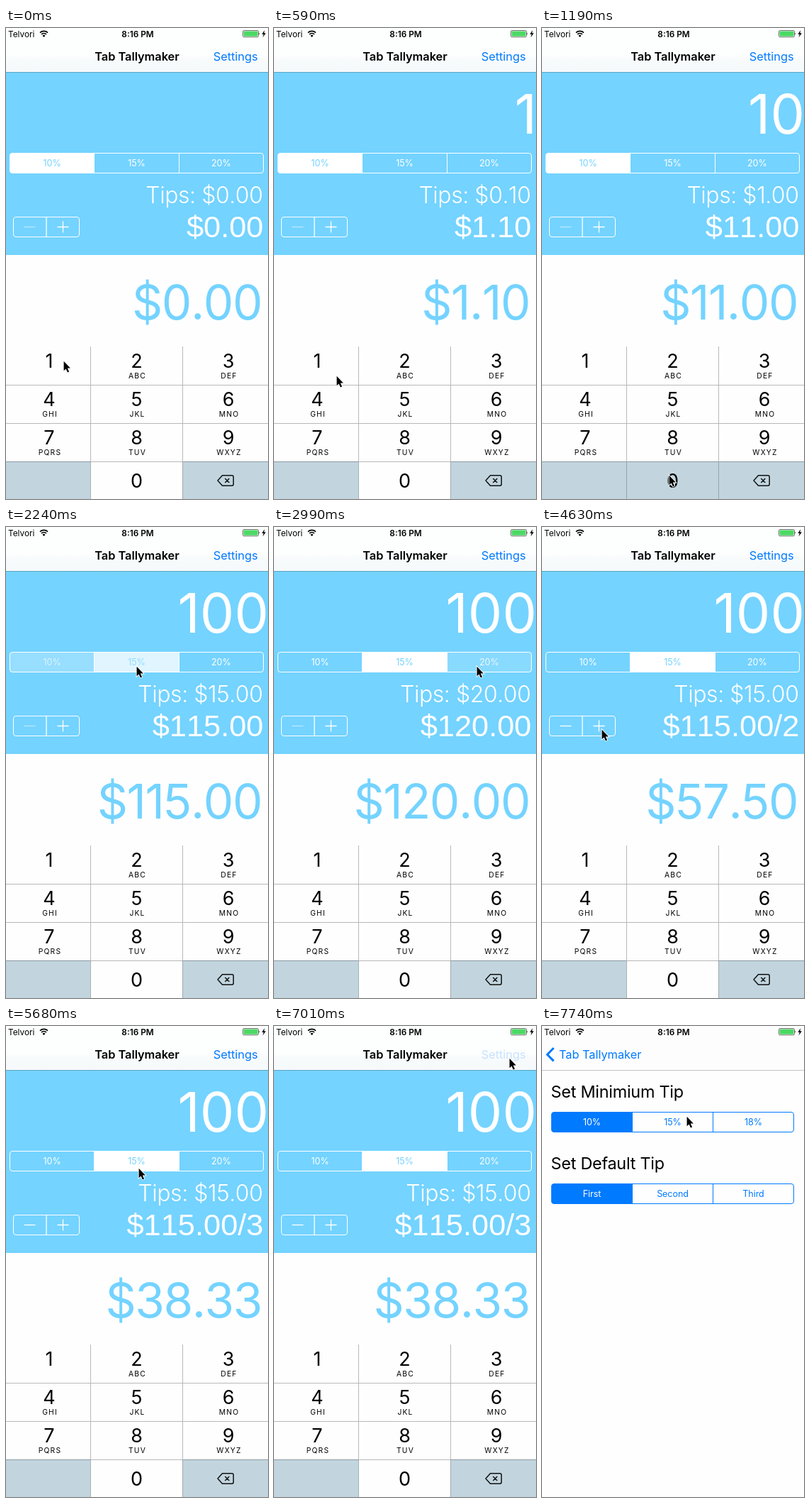
Write an HTML page that moves like this. It is 370 px wide and 664 px high and loops after 8000 ms.

```html
<!DOCTYPE html>
<html lang="en">
<head>
<meta charset="utf-8">
<title>Tip splitter</title>
<style>
  html, body { margin: 0; width: 100%; height: 100%; overflow: hidden; background: #fefefe; }
  svg { display: block; width: 100%; height: 100%; font-family: Inter, "Open Sans", sans-serif; }
  .mid { text-anchor: middle; }
  .end { text-anchor: end; }
  .label { font-size: 12.6px; letter-spacing: -.1px; }
  .nav { font-size: 16.4px; letter-spacing: -.05px; fill: #007aff; }
  .title { font-weight: 600; fill: #000; }
  .heading { font-size: 23.4px; letter-spacing: -.25px; }
  .digit { font-size: 27px; }
  .letters { font-size: 10.3px; letter-spacing: 1.2px; }
  .line { fill: none; stroke: #fff; }
  .figures { text-anchor: end; fill: #fff; font-kerning: none; }
  #total { font-family: "Liberation Sans", Arial, sans-serif; }
</style>
</head>
<body>
<svg viewBox="0 0 370 664">
  <defs>
    <linearGradient id="barTint" x2="0" y2="1">
      <stop offset=".6" stop-color="#fdfefe"/>
      <stop offset=".72" stop-color="#f8fbfc"/>
      <stop offset="1" stop-color="#f6f9fb"/>
    </linearGradient>
  </defs>

  <g id="main">
    <rect width="370" height="664" fill="#fefefe"/>
    <rect y="62" width="370" height="258" fill="#74d3ff"/>
    <g class="figures">
      <text id="amount" x="371" y="148.5" font-size="77"/>
      <text id="tips" x="362.5" y="247" font-size="32" font-weight="350" letter-spacing="-.45"/>
      <text id="total" x="363.5" y="295" font-size="43.4"/>
      <text id="share" x="361" y="411" font-size="67.5" letter-spacing="-1.5" fill="#74d3ff"/>
    </g>
    <g id="rates"></g>
    <rect id="plusPress" x="57" y="267" width="46" height="27" fill="#fff" opacity="0"/>
    <rect class="line" x="10.5" y="266.5" width="93" height="28" rx="3.5"/>
    <path class="line" d="M57 266.5v28M72.5 280.5h16M80.5 272.5v16" stroke-width="1.3"/>
    <path id="minus" class="line" d="M25.5 280.5h16" stroke-width="1.3"/>
    <g id="keypad"></g>
  </g>

  <g id="settings">
    <rect width="370" height="664" fill="#fefefe"/>
    <text class="heading" x="12.5" y="101">Set Minimium Tip</text>
    <text class="heading" x="12.5" y="202">Set Default Tip</text>
    <g id="choices"></g>
  </g>

  <rect width="370" height="62" fill="#fdfdfe"/>
  <rect id="tint" width="370" height="62" fill="url(#barTint)"/>
  <path d="M0 62.5h370" stroke="#000" opacity=".22"/>
  <text id="title" class="nav title mid" x="185" y="46">Tab Tallymaker</text>
  <text id="settingsLink" class="nav end" x="355.5" y="46">Settings</text>
  <g id="back">
    <path d="M16.5 31l-9 9.2 9 9.2" fill="none" stroke="#007aff" stroke-width="3"/>
    <text id="backLabel" class="nav" x="24" y="46">Tab Tallymaker</text>
  </g>

  <g id="status">
    <text x="3" y="12.5" font-size="11.8">Telvori</text>
    <path d="M48 6.6a8 8 0 0 1 11 0M50 8.9a5.2 5.2 0 0 1 7 0" fill="none" stroke="#000" stroke-width="1.7"/>
    <path d="M53.5 13l-2-2.3a3 3 0 0 1 4 0z"/>
    <text class="mid" x="186" y="12.5" font-size="11.8" font-weight="600">8:16 PM</text>
    <rect x="334.5" y="3.5" width="22" height="9.3" rx="1.6" fill="none" stroke="#555" stroke-width=".8"/>
    <rect x="335.5" y="4.5" width="20" height="7.3" rx=".8" fill="#4cd964"/>
    <path d="M357.3 6.3q1.6 1.7 0 3.4z"/>
    <path d="M365.3 3l-4 5.7h2.5l-1.3 4.6 4.4-6h-2.6z"/>
  </g>

  <path id="cursor" d="M.6 .8v13.4l3-2.8 2.3 5 2.2-1-2.3-4.9h4.1z" stroke="#fff" stroke-width="1.8" paint-order="stroke"/>
</svg>

<script>
const $ = id => document.getElementById(id);

function add(parent, tag, attrs, text = '') {
  const node = document.createElementNS('http://www.w3.org/2000/svg', tag);
  for (const name in attrs) node.setAttribute(name, attrs[name]);
  node.textContent = text;
  return parent.appendChild(node);
}

// Segmented control; returns its cells so they can be faded.
function segments(parent, x, y, width, labels, color) {
  const cell = width / labels.length;
  const cells = labels.map((label, i) => ({
    fill: add(parent, 'rect', { x: x + cell * i, y, width: cell, height: 28, rx: i ? 0 : 3, fill: color, opacity: 0 }),
    text: add(parent, 'text', { class: 'label mid', x: x + cell * (i + .5), y: y + 18.5, fill: color }, label)
  }));
  add(parent, 'rect', { x, y, width, height: 28, rx: 3.5, fill: 'none', stroke: color });
  for (let i = 1; i < labels.length; i++) {
    add(parent, 'path', { d: `M${Math.floor(x + cell * i) + .5} ${y}v28`, stroke: color });
  }
  return cells;
}

const rates = segments($('rates'), 5.5, 176.5, 358, ['10%', '15%', '20%'], '#fff');
for (const [y, labels] of [[121.5, ['10%', '15%', '18%']], [222.5, ['First', 'Second', 'Third']]]) {
  const [first] = segments($('choices'), 13.5, y, 342, labels, '#007aff');
  first.fill.setAttribute('opacity', 1);
  first.text.setAttribute('fill', '#fff');
}

const keypad = $('keypad'), keys = {};
const edges = [0, 119.5, 249.5, 370], centers = [61, 184.5, 314];
['1', '2ABC', '3DEF', '4GHI', '5JKL', '6MNO', '7PQRS', '8TUV', '9WXYZ', '', '0', ''].forEach((key, i) => {
  const col = i % 3, row = Math.floor(i / 3), top = 449 + row * 54;
  const rect = add(keypad, 'rect', {
    x: edges[col], y: top, width: edges[col + 1] - edges[col], height: 54, fill: key ? '#fefefe' : '#c2d5df'
  });
  if (!key) return;
  keys[key[0]] = rect;
  add(keypad, 'text', { class: 'digit mid', x: centers[col], y: top + (row < 3 ? 30 : 37) }, key[0]);
  add(keypad, 'text', { class: 'letters mid', x: centers[col] + 1, y: top + 45 }, key.slice(1));
});
add(keypad, 'path', { d: 'M119.5 449v215M249.5 449v215M0 503.5h370M0 557.5h370M0 611.5h370', stroke: '#000', opacity: .27 });
add(keypad, 'path', {
  d: 'M299 638l6.5-7.3h13.5q2.2 0 2.2 2.2v10.2q0 2.2-2.2 2.2h-13.5zM309.3 635l6 6M315.3 635l-6 6',
  fill: 'none', stroke: '#111', 'stroke-width': 1.5, 'stroke-linejoin': 'round'
});

const initial = { bill: 0, rate: .1, people: 1, fill: [1, 0, 0], key: '', plus: 0, link: 1, push: 0, at: [81, 469] };

// Each step lists only what changes at that time (ms).
const steps = [
  [290, { bill: 1, key: '1' }],
  [440, { key: '' }],
  [590, { at: [88, 490] }],
  [740, { at: [120, 545] }],
  [890, { at: [158, 604] }],
  [1040, { at: [179, 630] }],
  [1190, { bill: 10, key: '0' }],
  [1490, { bill: 100 }],
  [1640, { key: '', at: [182, 420] }],
  [1790, { at: [184, 196] }],
  [2240, { rate: .15, fill: [.25, .78, 0] }],
  [2390, { fill: [0, 1, 0] }],
  [2540, { at: [236, 197] }],
  [2690, { at: [286, 196] }],
  [2990, { rate: .2, fill: [0, 1, .15] }],
  [3140, { fill: [0, .25, .78] }],
  [3290, { fill: [0, 0, 1] }],
  [3440, { at: [272, 198] }],
  [3590, { at: [236, 200] }],
  [3740, { at: [218, 201] }],
  [3890, { rate: .15, fill: [0, .78, .25] }],
  [4040, { fill: [0, 1, 0], at: [190, 225] }],
  [4190, { at: [120, 268] }],
  [4340, { at: [84, 285] }],
  [4480, { people: 2, plus: .25 }],
  [4630, { plus: 0 }],
  [4780, { people: 3 }],
  [5680, { at: [187, 200] }],
  [5830, { at: [238, 140] }],
  [5970, { at: [290, 84] }],
  [6120, { at: [322, 54] }],
  [6270, { at: [332, 45] }],
  [6710, { link: .2 }],
  [7160, { push: .45 }],
  [7300, { push: .88, at: [310, 64] }],
  [7450, { push: .99, at: [262, 94] }],
  [7590, { push: 1, at: [222, 118] }],
  [7740, { at: [204, 127] }]
];

const money = value => '$' + value.toFixed(2);
const blend = a => `rgb(${255 - 139 * a},${255 - 44 * a},255)`;
const move = (id, x, y = 0) => $(id).setAttribute('transform', `translate(${x} ${y})`);
const fade = (id, a) => $(id).setAttribute('opacity', a);

function draw(state) {
  const { bill, rate, people, push } = state;
  const total = bill * (1 + rate);
  $('amount').textContent = bill || '';
  $('tips').textContent = 'Tips: ' + money(bill * rate);
  $('total').textContent = money(total) + (people > 1 ? '/' + people : '');
  $('share').textContent = money(total / people);

  rates.forEach(({ fill, text }, i) => {
    fill.setAttribute('opacity', state.fill[i]);
    text.setAttribute('fill', blend(state.fill[i]));
  });
  for (const key in keys) keys[key].setAttribute('fill', key === state.key ? '#c2d5df' : '#fefefe');

  fade('minus', people > 1 ? 1 : .5);
  fade('plusPress', state.plus);
  fade('title', 1 - push);
  fade('tint', 1 - push);
  fade('settingsLink', state.link * (1 - push));
  fade('back', push);
  move('title', -112 * push);
  move('backLabel', 112 * (1 - push));
  move('main', -111 * push);
  move('settings', 370 * (1 - push));
  move('cursor', ...state.at);
}

let shown = -1;
function frame(now) {
  const t = now % 8000;
  const passed = steps.filter(([time]) => time <= t);
  if (passed.length !== shown) {
    shown = passed.length;
    draw(Object.assign({}, initial, ...passed.map(step => step[1])));
  }
  requestAnimationFrame(frame);
}
frame(performance.now());
</script>
</body>
</html>
```
